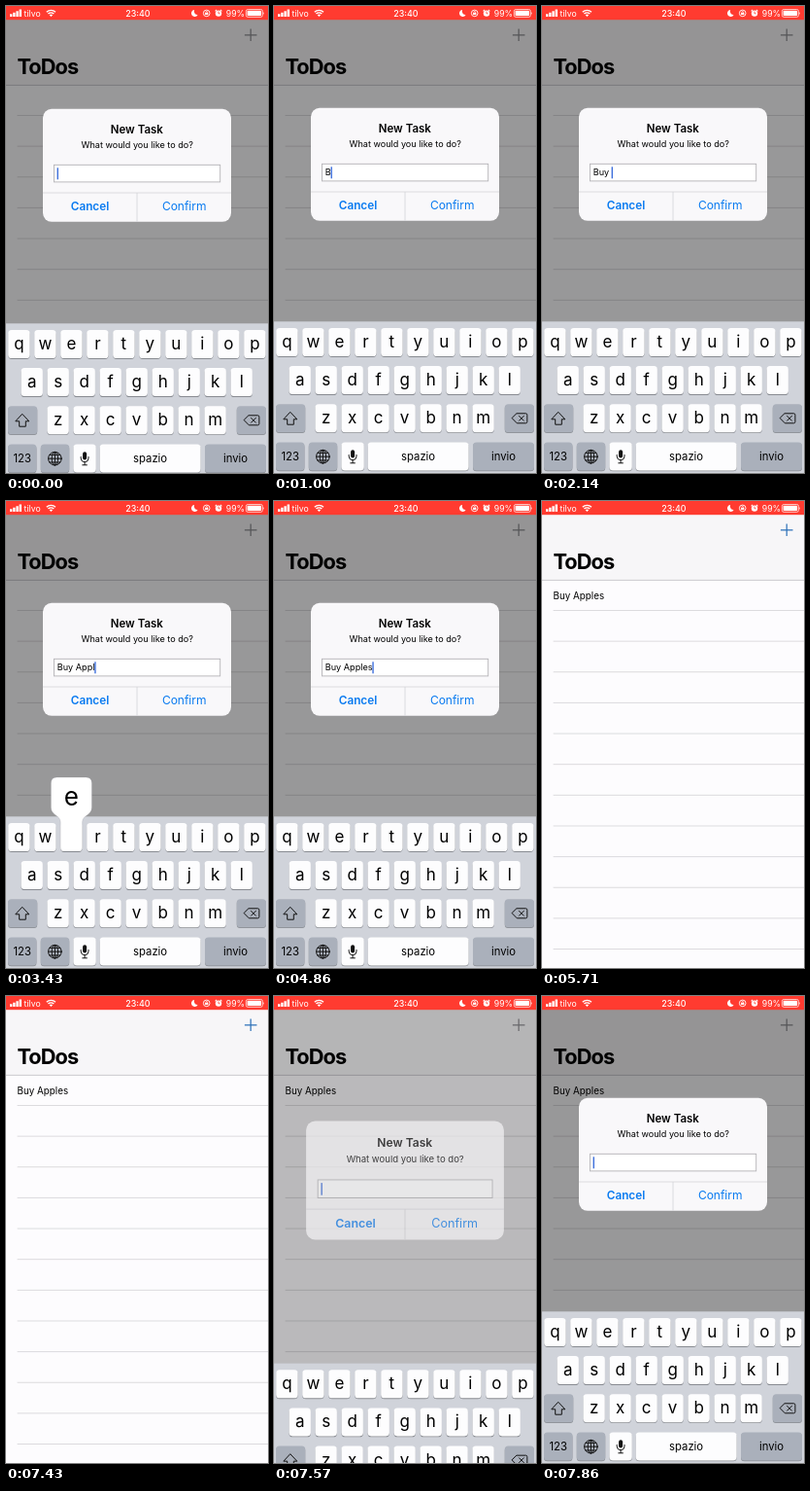
An HTML page for the animation above (8 s loop, 270 by 480 pixels).

```html
<!DOCTYPE html>
<html lang="en">
<head>
<meta charset="utf-8">
<title>ToDos</title>
<style>
html, body { margin: 0; width: 100%; height: 100%; overflow: hidden; background: #fdfcfe; }
svg { display: block; width: 100%; height: 100%; font-family: Inter, Roboto, sans-serif; }
text { white-space: pre; }
.mid { text-anchor: middle; }
.line { fill: none; stroke: #111; stroke-width: 1; stroke-linecap: round; stroke-linejoin: round; }
</style>
</head>
<body>
<svg viewBox="0 0 270 480">
  <g id="list"></g>
  <rect y="14" width="270" height="67" fill="#f7f6f8"/>
  <path d="M0 81.4H270" stroke="#c6c5c9" stroke-width=".9"/>
  <text x="11.4" y="70.3" font-size="21.8" font-weight="700" letter-spacing="-.95">ToDos</text>
  <path id="plus" d="M245.9 29.8h12.6M252.2 23.5v12.6" stroke-width="1.2"/>
  <text id="row" x="11.6" y="100.7" font-size="9.8">Buy Apples</text>
  <rect id="dim" y="14" width="270" height="466"/>

  <g id="status" fill="#fff" font-size="8.7">
    <rect width="270" height="14.2" fill="#ff3b30"/>
    <path d="M4 8.3h2.4V11H4zM7.2 6.8h2.4V11H7.2zM10.4 5.2h2.4V11h-2.4zM13.6 3.6H16V11h-2.4z"/>
    <text x="18.6" y="10.6">tilvo</text>
    <path d="M41.8 6.2a6.7 6.7 0 0 1 9.2 0M43.5 8.1a4.2 4.2 0 0 1 5.8 0" fill="none" stroke="#fff" stroke-width="1.4"/>
    <path d="M44.7 9.3a2.5 2.5 0 0 1 3.4 0l-1.7 1.8z"/>
    <text class="mid" x="135.8" y="10.7" font-size="8.9" font-weight="500">23:40</text>
    <path d="M194.1 4a3.5 3.5 0 1 0 3.5 5A3.6 3.6 0 0 1 194.1 4z"/>
    <circle cx="206.7" cy="7.4" r="3.3" fill="none" stroke="#fff" stroke-width=".9"/>
    <path d="M205.1 7h3.2v2.1h-3.2zM205.6 7V6.4a1.1 1.1 0 0 1 2.2 0V7h-.6v-.5a.5.5 0 0 0-1 0V7z"/>
    <circle cx="219" cy="7.6" r="3.2"/>
    <path d="M215.6 5.3l1.6-1.5M222.4 5.3l-1.6-1.5" stroke="#fff" stroke-width="1.1"/>
    <path d="M219 5.6v2.2h1.5" fill="none" stroke="#ff3b30" stroke-width=".8"/>
    <text x="226.8" y="10.6">99%</text>
    <rect x="247.4" y="3.5" width="17" height="7.8" rx="1.8" fill="none" stroke="#fff" stroke-width=".7"/>
    <rect x="248.6" y="4.7" width="14.5" height="5.4" rx=".8"/>
    <path d="M265.3 5.9q1.4 1.5 0 3z"/>
  </g>

  <g id="alert">
    <rect x="38" y="104.8" width="194" height="116" rx="9" fill="#f9f8fa"/>
    <text class="mid" x="134.8" y="130" font-size="11.5" font-weight="600">New Task</text>
    <text class="mid" x="135.2" y="145" font-size="9.1">What would you like to do?</text>
    <rect x="49.5" y="162.3" width="171.2" height="17.6" fill="#fff" stroke="#b4b3b7" stroke-width=".9"/>
    <text id="field" x="52.8" y="174.2" font-size="9.1"></text>
    <rect id="caret" y="165.3" width="1.4" height="12" fill="#3e6fdc"/>
    <path d="M38 191H232M135 191V220.8" stroke="#d4d3d8" stroke-width=".8"/>
    <g class="mid" fill="#087af0">
      <text x="86.5" y="209.3" font-size="11.8" font-weight="600">Cancel</text>
      <text x="183.7" y="209.3" font-size="12">Confirm</text>
    </g>
  </g>

  <g id="board">
    <rect y="324.3" width="270" height="160" fill="#d0d3da"/>
    <g id="keys"></g>
    <path id="shift" class="line" d="M17 417.6l6.8 7.2h-3.5v5.4h-6.6v-5.4h-3.5z"/>
    <path class="line" d="M250.3 418.8h9.2q1.4 0 1.4 1.4v7.2q0 1.4-1.4 1.4h-9.2l-4.9-5zM252.6 421.4l4.8 4.8M257.4 421.4l-4.8 4.8"/>
    <g class="line" stroke-width=".9">
      <circle cx="50.4" cy="463.2" r="6.8"/>
      <ellipse cx="50.4" cy="463.2" rx="3.2" ry="6.8"/>
      <path d="M50.4 456.4v13.6M43.6 463.2h13.6M45 459.4h10.8M45 467h10.8"/>
    </g>
    <rect x="79.1" y="456.3" width="4" height="8.2" rx="2" fill="#111"/>
    <path class="line" d="M77.2 461.5v1.3a3.9 3.9 0 0 0 7.8 0v-1.3M81.1 466.8v2.8M78.8 469.8h4.6"/>
    <g id="popup">
      <path fill="#fff" stroke="#8a8d94" stroke-opacity=".35" stroke-width=".6"/>
      <text class="mid" font-size="26"></text>
    </g>
  </g>
</svg>
<script>
const $ = id => document.getElementById(id);
const set = (node, attrs) => {
  for (const name in attrs) node.setAttribute(name, attrs[name]);
  return node;
};
const add = (parent, tag, attrs) =>
  parent.appendChild(set(document.createElementNS('http://www.w3.org/2000/svg', tag), attrs));

const LOOP = 8000, FPS = 7;
const LIGHT = '#fdfdfe', DARK = '#aab0bb';
const ROW_TOP = [331, 370.1, 409.2, 448.4];
const letters = {};

// [step, field text, pressed key]; '^' is shift
const TYPING = [
  [0, '', ''], [3, '', '^'], [7, 'B', ''], [11, 'B', 'u'], [12, 'Bu', ''],
  [13, 'Bu', 'y'], [14, 'Buy', ' '], [15, 'Buy ', ''], [18, 'Buy ', '^'],
  [19, 'Buy ', 'A'], [20, 'Buy A', ''], [21, 'Buy A', 'p'], [22, 'Buy Ap', 'p'],
  [23, 'Buy App', 'l'], [24, 'Buy Appl', 'e'], [25, 'Buy Apple', 's'],
  [26, 'Buy Apples', ''], [52, '', '']
];
const CARET = { 30: .4, 31: 0, 32: 0, 33: .5 };

function addKey(x, row, width, fill, label, size = 11.3) {
  const y = ROW_TOP[row], box = { x, width, height: 29, rx: 3.6 };
  add($('keys'), 'rect', { ...box, y: y + .9, fill: '#888b91' });
  const face = add($('keys'), 'rect', { ...box, y, fill });
  const text = add($('keys'), 'text', {
    x: x + width / 2, y: y + (size > 12 ? 20 : 18.8), 'font-size': size, class: 'mid'
  });
  text.textContent = label;
  return { face, text };
}

['qwertyuiop', 'asdfghjkl', 'zxcvbnm'].forEach((chars, row) => {
  [...chars].forEach((char, i) => {
    const x = [13.4, 26.7, 53.6][row] + 27 * i;
    letters[char] = { x, y: ROW_TOP[row], ...addKey(x - 11.2, row, 22.4, LIGHT, char, 17) };
  });
});
const shiftKey = addKey(2, 2, 30.2, DARK, '');
addKey(237.8, 2, 30.2, DARK, '');
addKey(2, 3, 29.4, DARK, '123');
addKey(35.8, 3, 29.4, DARK, '');
addKey(69.4, 3, 23.4, LIGHT, '');
const spaceKey = addKey(96.6, 3, 104, LIGHT, 'spazio');
addKey(205, 3, 63, DARK, 'invio');

for (let i = 0; i < 12; i++) {
  add($('list'), 'path', { d: `M11.6 ${112.5 + 31.64 * i}H270`, stroke: '#d8d7db', 'stroke-width': .9 });
}

const pen = document.createElement('canvas').getContext('2d');
pen.font = '91px Inter, Roboto, sans-serif';
const textWidth = text => pen.measureText(text).width / 10;

const easeOut = (t, start, length) => {
  const u = Math.min(1, Math.max(0, (t - start) / length));
  return 1 - (1 - u) ** 3;
};

function balloon(x, y) {
  const mid = Math.min(247, Math.max(23, x));
  const [l, r, L, R] = [x - 11.2, x + 11.2, mid - 21, mid + 21];
  set($('popup').children[0], {
    d: `M${l} ${y + 25}V${y - 1}C${l} ${y - 8} ${L} ${y - 8} ${L} ${y - 16}V${y - 41}` +
       `q0-6 6-6H${R - 6}q6 0 6 6V${y - 16}C${R} ${y - 8} ${r} ${y - 8} ${r} ${y - 1}` +
       `V${y + 25}q0 4-4 4H${l + 4}q-4 0-4-4z`
  });
  set($('popup').children[1], { x: mid, y: y - 18 });
}

function drawKeyboard(pressed) {
  const upper = pressed === '^' || /[A-Z]/.test(pressed);
  for (const char in letters) {
    letters[char].text.textContent = upper ? char.toUpperCase() : char;
  }
  set(shiftKey.face, { fill: upper ? LIGHT : DARK });
  $('shift').style.fill = upper ? '#111' : 'none';
  set(spaceKey.face, { fill: pressed === ' ' ? DARK : LIGHT });

  const key = letters[pressed.toLowerCase()];
  set($('popup'), { visibility: key ? 'visible' : 'hidden' });
  if (key) {
    balloon(key.x, key.y);
    $('popup').children[1].textContent = pressed;
  }
}

function draw(step) {
  const t = step * 1000 / FPS;
  const [, text, pressed] = TYPING.filter(entry => entry[0] <= step).pop();
  const opening = step >= 52;
  const shown = opening ? easeOut(t, 7450, 400) : 1 - easeOut(t, 5230, 450);
  const drop = step === 0 ? 2 : (1 - shown) * 158;
  const zoom = opening ? 1.15 - .15 * shown : 1;

  set($('board'), { transform: `translate(0 ${drop})`, visibility: shown > 0 ? 'visible' : 'hidden' });
  set($('alert'), {
    opacity: shown,
    transform: `translate(135 ${163 + drop / 2}) scale(${zoom}) translate(-135 -163)`
  });
  set($('dim'), { opacity: .4 * shown });
  set($('plus'), { stroke: shown > .3 ? '#8c8c90' : '#2c70b8' });
  set($('row'), { visibility: step >= 37 ? 'visible' : 'hidden' });

  $('field').textContent = text;
  set($('caret'), { x: 52.6 + textWidth(text), opacity: CARET[step] ?? 1 });
  drawKeyboard(pressed);
  if (shown === 0) set($('popup'), { visibility: 'hidden' });
}

let last = -1;
function tick() {
  const step = Math.floor((performance.now() % LOOP + 5) * FPS / 1000) % (LOOP * FPS / 1000);
  if (step !== last) draw(last = step);
  requestAnimationFrame(tick);
}
tick();
</script>
</body>
</html>
```
